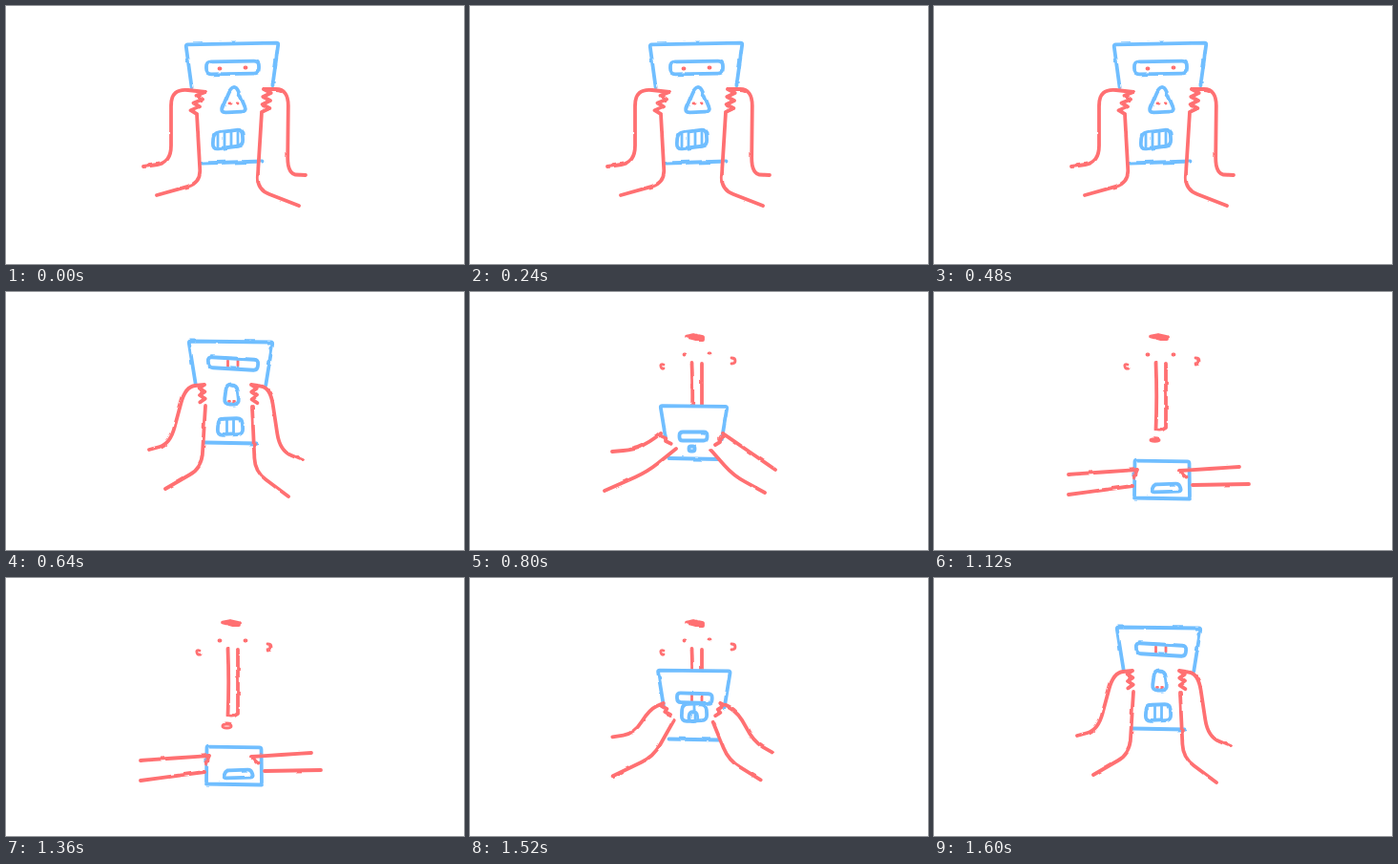
Recreate the animation shown at these times as an HTML page. Size 480 by 270 pixels, loop 1680 ms.

```html
<!DOCTYPE html>
<html lang="en">
<head>
<meta charset="utf-8">
<title>Mask peek</title>
<style>
  html, body { margin: 0; width: 100%; height: 100%; overflow: hidden; background: #fff; }
  svg { display: block; width: 100vw; height: 100vh; }
  path, ellipse { fill: none; stroke-width: 3.8; stroke-linecap: round; stroke-linejoin: round; }
  .red { stroke: #ff7072; }
  .blue { stroke: #70beff; }
  .thin { stroke-width: 2.8; }
  #sheet { fill: #fff; }
  #brow { fill: #ff7072; }
</style>
</head>
<body>
<svg viewBox="0 0 480 270">
  <defs>
    <filter id="rough" filterUnits="userSpaceOnUse" x="0" y="0" width="480" height="270" color-interpolation-filters="sRGB">
      <feTurbulence id="grain" type="fractalNoise" baseFrequency=".07" numOctaves="2" result="n"/>
      <feDisplacementMap in="SourceGraphic" in2="n" scale="2.4" xChannelSelector="R" yChannelSelector="G"/>
    </filter>
  </defs>
  <g filter="url(#rough)">
    <g id="face">
      <path id="brow" class="red" d="M227 46.5L235 45L244 47V49L237 49Z"/>
      <path class="red thin" d="M203 76Q199 75 200 78T203 80M274 69Q278 69 278 72T274 75"/>
      <path class="red" d="M232.5 74Q234 110 232.5 144Q238 146 243 142V75"/>
      <ellipse id="lips" class="red thin" cx="231.5" cy="155" rx="4.6"/>
    </g>
    <path id="sheet"/>
    <path id="eyes" class="red" d="M223.5 65.5h1M250.5 64.5h1"/>
    <path id="peek" class="red thin"/>
    <path id="edges" class="blue"/>
    <path id="holes" class="blue"/>
    <path id="teeth" class="blue thin"/>
    <path id="arms" class="red"/>
  </g>
</svg>
<script>
const FRAME = 80, COUNT = 21;

// Sheet and holes: centre x, centre y, top width, bottom width, height, tilt.
// Arms: [shoulder to fingertips, palm to shoulder]; two points make a straight line.
const poses = [
  { // held up
    sheet: [237, 101.5, 97, 63, 124, -2],
    slot: [237.5, 64.5, 55, 55, 13, -1],
    nose: [238.5, 98, 6, 28, 26, -1],
    mouth: [232.5, 139.5, 30, 32, 17, -4],
    left: [[[144, 168], [173, 164], [173, 86], [209, 90]], [[200, 113], [204, 185], [158, 198]]],
    right: [[[314, 177], [295, 176], [296, 87], [270, 87]], [[268, 111], [263, 192], [307, 209]]]
  },
  { // leaving
    sheet: [235.5, 105, 88, 54, 106, 1],
    slot: [238, 75, 53, 51, 11, 3],
    nose: [236.5, 107.5, 11, 16, 20, 0],
    mouth: [235, 141, 25, 27, 17, -1],
    left: [[[150, 165], [172, 159], [188, 99], [208, 97]], [[209, 119], [205, 184], [167, 206]]],
    right: [[[311, 176], [287, 166], [277, 100], [257, 97]], [[258, 120], [261, 188], [296, 214]]]
  },
  { // folding down
    sheet: [234.5, 147, 70, 52, 55, 1],
    slot: [234, 151, 29, 29, 9, 0],
    nose: [232.5, 164, 6, 6, 5, 0],
    left: [[[149, 167], [172, 165], [188, 157], [200, 148]], [[216, 164], [186, 188], [141, 208]]],
    right: [[[320, 186], [265, 148]], [[253, 166], [276, 192], [309, 210]]]
  },
  { // resting low
    sheet: [239, 196.5, 57, 58, 39, 1],
    slot: [243.5, 205, 26, 32, 8, -1],
    left: [[[140, 191], [213, 186]], [[208, 203], [141, 212]]],
    right: [[[320, 183], [257, 187]], [[271, 202], [330, 201]]]
  }];

const $ = id => document.getElementById(id);
const set = (id, d) => $(id).setAttribute('d', d);
const show = (id, on) => { $(id).style.display = on ? '' : 'none'; };

// Blends numbers or nested lists of them.
const mix = (a, b, k) => Array.isArray(a) ? a.map((v, i) => mix(v, b[i], k)) : a + (b - a) * k;

// Divides a two-point line so that it has n points.
const spread = (pts, n) => pts.length === n ? pts
  : Array.from({ length: n }, (_, i) => mix(pts[0], pts[1], i / (n - 1)));

for (const p of poses)
  for (const side of ['left', 'right'])
    p[side] = [spread(p[side][0], 4), spread(p[side][1], 3)];

function poseAt(pos) {
  const i = Math.min(poses.length - 2, Math.floor(pos)), a = poses[i], b = poses[i + 1];
  return Object.fromEntries(Object.keys(a).map(k => [k, mix(a[k], b[k] || a[k], pos - i)]));
}

// 0 held up, 3 resting low: a hard drop, a rest, a quicker rise.
const position = f => f < 8 ? 0 : Math.min(3, 1 + (f - 8) / 2, 1 + (20 - f) * 2 / 3);

function corners([x, y, top, bottom, h, tilt]) {
  const at = (w, dx, dy) => [x + dx * w / 2, y + dy * h / 2 + dx * tilt / 2];
  return [at(top, -1, -1), at(top, 1, -1), at(bottom, 1, 1), at(bottom, -1, 1)];
}

function rounded(pts, r, closed) {
  const n = pts.length;
  const toward = (p, q) => mix(p, q, Math.min(.5, r / Math.hypot(q[0] - p[0], q[1] - p[1])));
  const steps = pts.map((p, i) => !closed && (i === 0 || i === n - 1) ? `${p}`
    : `${toward(p, pts[(i + n - 1) % n])}Q${p} ${toward(p, pts[(i + 1) % n])}`);
  return 'M' + steps.join('L') + (closed ? 'Z' : '');
}

// Outer arm, zigzag knuckles, inner arm; the fingers fold away as the hands sink.
function arm([outer, inner], dir, pos) {
  const knuckles = Array.from({ length: 7 - Math.round(pos) }, (_, i) => {
    const [x, y] = mix(outer[3], inner[0], i / 6);
    return [x - dir * (i % 2) * (8 - 2.5 * pos), y];
  });
  return rounded(outer, 18) + 'M' + knuckles.join('L') + rounded(inner, 14);
}

function draw(f) {
  const pos = position(f), p = poseAt(pos);
  const [tl, tr, br, bl] = corners(p.sheet);
  const reach = .36 + .065 * pos * pos;
  set('sheet', `M${[tl, tr, br, bl].join('L')}Z`);
  set('edges', rounded([mix(tl, bl, reach), tl, tr, mix(tr, br, reach)], 2) + `M${bl}L${br}`);

  const holes = [p.slot];
  if (pos <= 2) holes.push(p.nose);
  if (pos < 2) holes.push(p.mouth);
  set('holes', holes.map(h => rounded(corners(h), Math.min(6, h[4] / 2.5), true)).join(''));

  const count = pos < 2 ? Math.round(4 - 2 * pos) : 0;
  set('teeth', Array.from({ length: count }, (_, i) =>
    `M${p.mouth[0] + (i - (count - 1) / 2) * 7} ${p.mouth[1] - 7}v14`).join(''));

  // What the holes reveal: nostrils, and the nose bridge while the mask moves.
  let peek = '';
  if (pos <= 1) {
    const [x, y] = p.nose, gap = 4 - 1.5 * pos;
    for (const s of [-1, 1]) peek += `M${x + s * gap - .5} ${y + 4 + 3 * pos}h1`;
  }
  if (pos >= 1 && pos < 2)
    for (const x of [232.5, 243]) peek += `M${x} ${p.slot[1] - 3}v6`;
  set('peek', peek);

  set('arms', arm(p.left, 1, pos) + arm(p.right, -1, pos));
  show('face', pos > 1);
  show('eyes', pos !== 1);
  $('lips').setAttribute('ry', 1.3 + f % 2 * .7);
  $('grain').setAttribute('seed', f % 3 + 1);
}

let shown = -1;
function tick() {
  const f = Math.floor(performance.now() / FRAME) % COUNT;
  if (f !== shown) draw(shown = f);
  requestAnimationFrame(tick);
}
tick();
</script>
</body>
</html>
```
